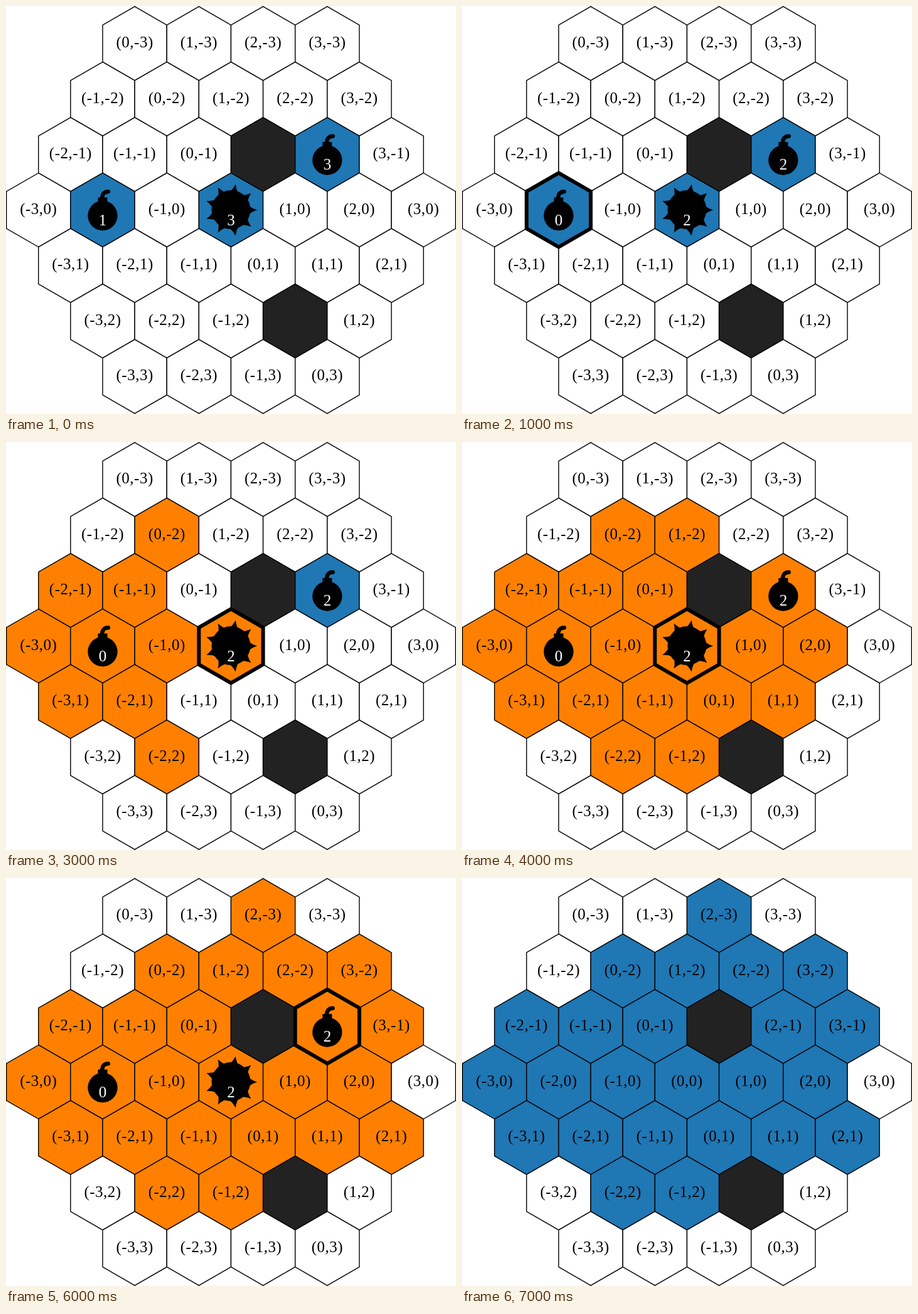
An HTML page that plays this animation: 717 px wide and 651 px high, repeating every 8 s.

```html
<!DOCTYPE html>
<html lang="en">
<head>
<meta charset="utf-8">
<title>Hex grid chain explosion</title>
<style>
  html, body { margin: 0; width: 100%; height: 100%; overflow: hidden; background: #fff; }
  svg { display: block; width: 717px; height: 651px; }
  text { font: 25px "Liberation Serif", "Noto Serif", serif; text-anchor: middle; letter-spacing: .5px; }
  .hex { stroke: #000; stroke-width: 1.4; }
  .active { fill: none; stroke: #000; stroke-width: 6; }
  .count { fill: #fff; letter-spacing: 0; }
  .fuse { fill: none; stroke: #000; stroke-width: 6.5; stroke-linecap: round; }
</style>
</head>
<body>
<svg id="board" viewBox="0 0 717 651"></svg>
<script>
const board = document.getElementById('board');
const BLUE = '#1f77b4', ORANGE = '#ff8000', WALL = '#222', EMPTY = '#fff';
const STEP_MS = 1000, STEPS = 8, END = 7;
const COLUMN = 102.25, RADIUS = COLUMN / Math.sqrt(3), RANGE = 2;
const DIRECTIONS = [[1, 0], [-1, 0], [0, 1], [0, -1], [1, -1], [-1, 1]];

const key = (q, r) => `${q},${r}`;
const walls = new Set(['1,-1', '0,2']);
// Each charge is highlighted at step `at` and explodes one step later.
const charges = [
  { q: -2, r: 0, timer: 1, at: 1, type: 'bomb' },
  { q: 0, r: 0, timer: 3, at: 3, type: 'mine' },
  { q: 2, r: -1, timer: 3, at: 5, type: 'bomb' },
];

const cells = [];
for (let r = -3; r <= 3; r++)
  for (let q = Math.max(-3, -3 - r); q <= Math.min(3, 3 - r); q++)
    cells.push({ q, r, x: 358.5 + COLUMN * (q + r / 2), y: 325.5 + 1.5 * RADIUS * r });

// A bomb fires along six rays.
function rays({ q, r }) {
  const hit = new Set([key(q, r)]);
  for (const [dq, dr] of DIRECTIONS)
    for (let i = 1; i <= RANGE; i++) {
      const k = key(q + dq * i, r + dr * i);
      if (walls.has(k)) break;
      hit.add(k);
    }
  return hit;
}

// A mine floods outward around walls.
function flood({ q, r }) {
  const hit = new Set([key(q, r)]);
  for (let i = 0; i < RANGE; i++)
    for (const k of [...hit]) {
      const [a, b] = k.split(',').map(Number);
      for (const [dq, dr] of DIRECTIONS) {
        const next = key(a + dq, b + dr);
        if (!walls.has(next)) hit.add(next);
      }
    }
  return hit;
}

for (const c of charges) c.blast = c.type === 'mine' ? flood(c) : rays(c);

const polar = (radius, degrees) => {
  const a = degrees * Math.PI / 180;
  return `${(radius * Math.cos(a)).toFixed(2)} ${(radius * Math.sin(a)).toFixed(2)}`;
};
const hexPoints = [30, 90, 150, 210, 270, 330].map(a => polar(RADIUS, a)).join(' ');
const hexagon = attributes => `<polygon points="${hexPoints}" ${attributes}/>`;
const spikes = Array.from({ length: 9 }, (_, i) => i * 40).map(a =>
  `M${polar(29, a - 15)}Q${polar(33, a - 5)} ${polar(41.7, a)}Q${polar(33, a + 5)} ${polar(29, a + 15)}Z`).join('');

const icons = {
  bomb: '<circle cy="9" r="23.7"/><rect x="-7.5" y="-20" width="15" height="9"/>' +
        '<path class="fuse" d="M-.8-18C-1-25 2-29.3 8.8-29.3"/>',
  mine: `<circle cy="-.5" r="31"/><path d="${spikes}"/>`,
};

function colorOf(k, charge, step) {
  if (walls.has(k)) return WALL;
  if (charges.some(c => step > c.at && c.blast.has(k))) return step === END ? BLUE : ORANGE;
  return charge ? BLUE : EMPTY;
}

function render(step) {
  let tiles = '', highlight = '';
  for (const { q, r, x, y } of cells) {
    const k = key(q, r);
    const charge = charges.find(c => c.q === q && c.r === r);
    const place = `transform="translate(${x} ${y})"`;
    let content = '';
    if (charge && step < END) {
      const count = charge.timer - (step > 0);
      content = `${icons[charge.type]}<text class="count" y="24">${count}</text>`;
      if (step === charge.at || step === charge.at + 1)
        highlight = hexagon(`class="active" ${place}`);
    } else if (!walls.has(k)) {
      content = `<text y="6.3">(${k})</text>`;
    }
    tiles += `<g ${place}>${hexagon(`class="hex" fill="${colorOf(k, charge, step)}"`)}${content}</g>`;
  }
  board.innerHTML = tiles + highlight;
}

let shown = -1;
function tick() {
  const step = Math.floor(performance.now() / STEP_MS) % STEPS;
  if (step !== shown) render(shown = step);
  requestAnimationFrame(tick);
}
tick();
</script>
</body>
</html>
```
